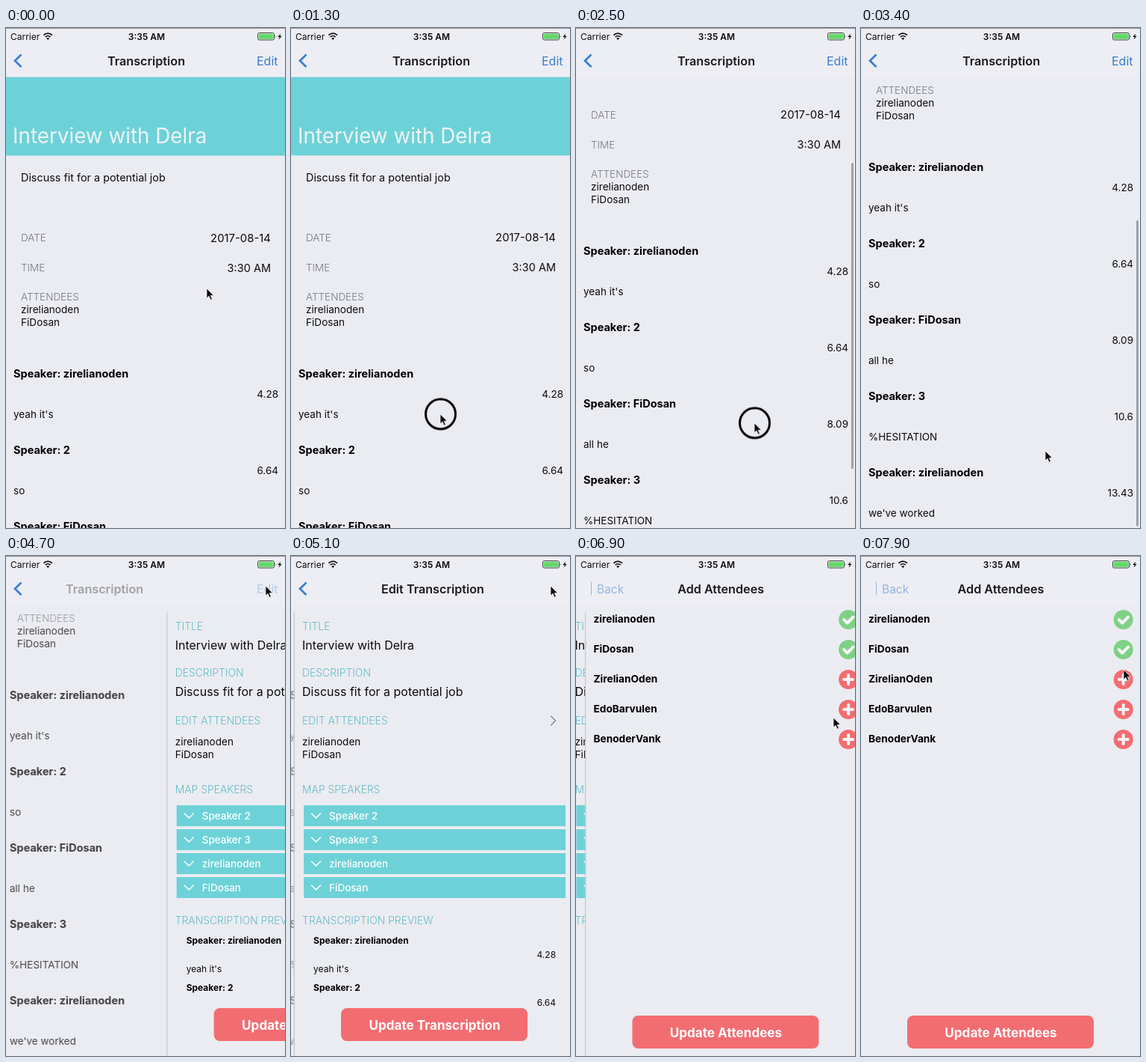
Animation of 374 by 668 pixels, one loop 8000 ms. Source, as an HTML page:

```html
<!DOCTYPE html>
<html lang="en">
<head>
<meta charset="utf-8">
<title>Transcription</title>
<style>
  /* scroll offset in px, progress of the first and second page push */
  @property --scroll { syntax: "<number>"; inherits: true; initial-value: 0; }
  @property --push1 { syntax: "<number>"; inherits: true; initial-value: 0; }
  @property --push2 { syntax: "<number>"; inherits: true; initial-value: 0; }

  html, body { margin: 0; width: 100%; height: 100%; overflow: hidden; background: #ebecf1; }
  svg {
    display: block; width: 374px; height: 668px;
    font-family: Inter, sans-serif; font-size: 13.5px; fill: #0c0c0e;
    animation: scroll 8s linear infinite, push1 8s linear infinite, push2 8s linear infinite;
  }
  .line { fill: none; stroke-linecap: round; stroke-linejoin: round; }
  .end { text-anchor: end; }
  .mid { text-anchor: middle; }
  .bg { fill: #ebecf1; }
  .teal { fill: #6dd2d8; }
  .red { fill: #f26d71; }
  .green { fill: #7fd186; }
  .blue { fill: #3a7ccf; }

  .hero { font-size: 27.8px; fill: #eef3f7; }
  .desc { font-size: 14.4px; }
  .key { font-weight: 300; fill: #77787d; }
  .date { font-size: 14.9px; text-anchor: end; }
  .time { font-size: 14.5px; text-anchor: end; }
  .name { font-size: 13.6px; }
  .who { font-size: 14.5px; font-weight: 700; fill: #000; }
  .label { font-size: 13.9px; font-weight: 300; fill: #62bcc8; }
  .field { font-size: 16px; }
  .speaker { font-weight: 500; fill: #fff; }
  .preview { font-size: 12px; }
  .preview .who { font-size: 12px; }
  .cta { font-size: 17.1px; font-weight: 700; fill: #fff; text-anchor: middle; }
  .person { font-size: 13.7px; font-weight: 700; fill: #000; }
  .title { font-size: 16.2px; font-weight: 600; text-anchor: middle; fill: #1b1b1e; }

  #detail {
    transform: translateX(calc(var(--push1) * -12px));
    opacity: calc(1 - .62 * var(--push1));
  }
  #content { transform: translateY(calc(var(--scroll) * -1px)); }
  #bar {
    transform: translateY(calc(var(--scroll) * .6875px));
    animation: bar 8s linear infinite;
  }
  #edit { transform: translateX(calc((1 - var(--push1)) * 380px - var(--push2) * 12px)); }
  #people { transform: translateX(calc((1 - var(--push2)) * 380px)); }

  #title1 {
    transform: translateX(calc(var(--push1) * -130px));
    opacity: calc(1 - 1.5 * var(--push1));
  }
  #title2 {
    transform: translateX(calc((1 - var(--push1)) * 187px - var(--push2) * 130px));
    opacity: min(2 * var(--push1) - .9, 1 - 1.5 * var(--push2));
  }
  #title3 {
    transform: translateX(calc((1 - var(--push2)) * 187px));
    opacity: calc(2 * var(--push2) - .9);
  }
  #editLink { opacity: calc(1 - 1.6 * var(--push1)); }
  #arrow { animation: arrow 8s linear infinite; }
  #back { opacity: calc(.5 * var(--push2)); }
  #tapped { animation: tapped 8s linear infinite; }
  #cursor { animation: cursor 8s ease-in-out infinite; }
  #ring { animation: ring 8s step-end infinite; }

  @keyframes scroll {
    0%, 16.25% { --scroll: 0; }
    22.5% { --scroll: 118; animation-timing-function: ease-out; }
    28.75%, 31.25% { --scroll: 164; }
    35% { --scroll: 255; animation-timing-function: ease-out; }
    38.75%, 100% { --scroll: 276; }
  }
  @keyframes push1 {
    0%, 57.5% { --push1: 0; animation-timing-function: cubic-bezier(.2, .45, .4, 1); }
    63.75% { --push1: .9866; animation-timing-function: ease-out; }
    67.5%, 100% { --push1: 1; }
  }
  @keyframes push2 {
    0%, 81.25% { --push2: 0; animation-timing-function: cubic-bezier(.2, .45, .4, 1); }
    87.5% { --push2: .9866; animation-timing-function: ease-out; }
    91.25%, 100% { --push2: 1; }
  }
  @keyframes bar {
    0%, 16.25% { opacity: 0; }
    17.5%, 44% { opacity: 1; }
    48%, 100% { opacity: 0; }
  }
  @keyframes arrow {
    0%, 80.5% { opacity: 1; }
    83.5%, 100% { opacity: 0; }
  }
  @keyframes tapped {
    0%, 80% { opacity: 1; }
    80.5%, 81.5% { opacity: .35; }
    85%, 100% { opacity: 1; }
  }
  @keyframes cursor {
    0%, 2.5% { transform: translate(269px, 348px); }
    13.75%, 16.25% { transform: translate(200px, 516px); animation-timing-function: linear; }
    22% { transform: translate(212px, 402px); }
    29%, 31.25% { transform: translate(239px, 528px); animation-timing-function: linear; }
    35% { transform: translate(241px, 437px); }
    41%, 43% { transform: translate(247px, 565px); }
    55%, 66% { transform: translate(348px, 40px); }
    77.5%, 86% { transform: translate(345px, 216px); }
    97%, 100% { transform: translate(352px, 152px); }
  }
  @keyframes ring {
    0% { opacity: 0; }
    15% { opacity: 1; }
    22% { opacity: 0; }
    30.5% { opacity: 1; }
    35% { opacity: 0; }
    56% { opacity: 1; }
    57.5% { opacity: 0; }
    79.5% { opacity: 1; }
    81% { opacity: 0; }
  }
</style>
</head>
<body>
<svg viewBox="0 0 374 668">
  <rect class="bg" width="374" height="668"/>

  <g id="detail">
    <g id="content">
      <rect class="teal" y="65" width="374" height="105.500"/>
      <text class="hero" x="9" y="154">Interview with Delra</text>
      <text class="desc" x="20" y="205">Discuss fit for a potential job</text>
      <text class="key" x="20" y="285">DATE</text>
      <text class="date" x="355" y="285.500">2017-08-14</text>
      <text class="key" x="20" y="325">TIME</text>
      <text class="time" x="355" y="325.500">3:30 AM</text>
      <text class="key" x="20" y="364">ATTENDEES</text>
      <text class="name" x="20" y="381">zirelianoden</text>
      <text class="name" x="20" y="398">FiDosan</text>
      <g id="rows"></g>
    </g>
    <rect id="bar" x="369" y="67" width="3" height="409" rx="1.500" fill="#9fa0a5"/>
  </g>

  <g id="edit">
    <rect x="-1.500" y="75" width="1.500" height="593" fill="#c9cacf"/>
    <rect class="bg" width="374" height="668"/>
    <text class="label" x="10" y="99">TITLE</text>
    <text class="field" x="10" y="125">Interview with Delra</text>
    <text class="label" x="10" y="161">DESCRIPTION</text>
    <text class="field" x="10" y="187">Discuss fit for a potential job</text>
    <g id="tapped">
      <text class="label" x="10" y="224.500">EDIT ATTENDEES</text>
      <path class="line" d="M343.500 214l6 6-6 6" stroke="#85868b" stroke-width="1.400"/>
    </g>
    <text class="name" x="10" y="253">zirelianoden</text>
    <text class="name" x="10" y="270">FiDosan</text>
    <text class="label" x="10" y="317">MAP SPEAKERS</text>
    <g id="speakers"></g>
    <text class="label" x="10" y="492">TRANSCRIPTION PREVIEW</text>
    <g class="preview">
      <text class="who" x="25" y="517.500">Speaker: zirelianoden</text>
      <text class="end" x="350" y="537">4.28</text>
      <text x="25" y="556">yeah it's</text>
      <text class="who" x="25" y="581">Speaker: 2</text>
      <text class="end" x="350" y="600.500">6.64</text>
    </g>
    <rect class="red" x="62" y="604" width="250" height="44" rx="8"/>
    <text class="cta" x="187.500" y="632.500">Update Transcription</text>
  </g>

  <g id="people">
    <rect x="-1.500" y="75" width="1.500" height="593" fill="#c9cacf"/>
    <rect class="bg" width="374" height="668"/>
    <g id="persons"></g>
    <rect class="red" x="62" y="614" width="250" height="44" rx="8"/>
    <text class="cta" x="187.500" y="642.500">Update Attendees</text>
  </g>

  <g id="nav">
    <rect width="374" height="65.500" fill="#edeef3"/>
    <rect width="374" height="1" fill="#8d8e92"/>
    <text x="6" y="15.500" font-size="12">Carrier</text>
    <g class="line" stroke="#111" stroke-width="1.700" style="stroke-linecap:butt">
      <path d="M50.500 9.600a8 8 0 0 1 11.400 0M52.700 12a5 5 0 0 1 7 0"/>
    </g>
    <path d="M56.200 16l-2-2.200a3 3 0 0 1 4 0z"/>
    <text class="mid" x="188.500" y="15.500" font-size="12" font-weight="600">3:35 AM</text>
    <rect x="337.500" y="6.500" width="22" height="9.500" rx="2" fill="#edeef3" stroke="#444"/>
    <rect x="338.700" y="7.700" width="19.600" height="7.100" rx="1" fill="#62d867"/>
    <path d="M360.800 9.500q1.400 1.700 0 3.500z"/>
    <path d="M368.200 7.500l-4 4.500h2.500l-1 3.500 4-4.700h-2.500z"/>
    <path id="arrow" class="line" d="M20.500 35.500l-8.500 8.200 8.500 8.200" stroke="#3a7fd6" stroke-width="2.800" style="stroke-linecap:butt;stroke-linejoin:miter"/>
    <g id="back">
      <path class="line" d="M20.500 35v17" stroke="#3a7ccf"/>
      <text class="blue" x="28" y="49.500" font-size="15.500">Back</text>
    </g>
    <text id="title1" class="title" x="188" y="49.500">Transcription</text>
    <text id="title2" class="title" x="187.500" y="49.500">Edit Transcription</text>
    <text id="title3" class="title" x="187.500" y="49.500">Add Attendees</text>
    <text id="editLink" class="blue end" x="364.500" y="49.500" font-size="16">Edit</text>
  </g>

  <g id="cursor">
    <circle id="ring" class="line" cx=".5" r="20" stroke="#000" stroke-width="3"/>
    <path d="M0 0v13l3-2.700 2.200 4.900 2.200-1-2.200-4.700h4.200z" stroke="#fff" stroke-width=".7"/>
  </g>
</svg>
<script>
  const fill = (id, items, draw) => {
    document.getElementById(id).innerHTML = items.map(draw).join("");
  };

  const lines = [
    ["zirelianoden", "4.28", "yeah it's"],
    ["2", "6.64", "so"],
    ["FiDosan", "8.09", "all he"],
    ["3", "10.6", "%HESITATION"],
    ["zirelianoden", "13.43", "we've worked"]
  ];
  fill("rows", lines, ([who, time, said], i) => `
    <g transform="translate(0 ${467 + 102 * i})">
      <text class="who" x="10">Speaker: ${who}</text>
      <text class="end" x="365" y="27">${time}</text>
      <text x="10" y="54">${said}</text>
    </g>`);

  fill("speakers", ["Speaker 2", "Speaker 3", "zirelianoden", "FiDosan"], (name, i) => `
    <g transform="translate(0 ${333 + 32 * i})">
      <rect class="teal" x="12" width="351" height="28"/>
      <path class="line" d="M22.500 11l6 6 6-6" stroke="#fff" stroke-width="1.500"/>
      <text class="speaker" x="46" y="18.500">${name}</text>
    </g>`);

  const check = "M-6 0l4.500 4.500 8-8";
  const plus = "M-6 0h12M0-6v12";
  const names = ["zirelianoden", "FiDosan", "ZirelianOden", "EdoBarvulen", "BenoderVank"];
  fill("persons", names, (name, i) => `
    <g transform="translate(0 ${85 + 40 * i})">
      <text class="person" x="10" y="4">${name}</text>
      <g transform="translate(351.700 0)">
        <circle class="${i < 2 ? "green" : "red"}" r="13"/>
        <path class="line" d="${i < 2 ? check : plus}" stroke="#f4f5f8" stroke-width="4"/>
      </g>
    </g>`);
</script>
</body>
</html>
```
